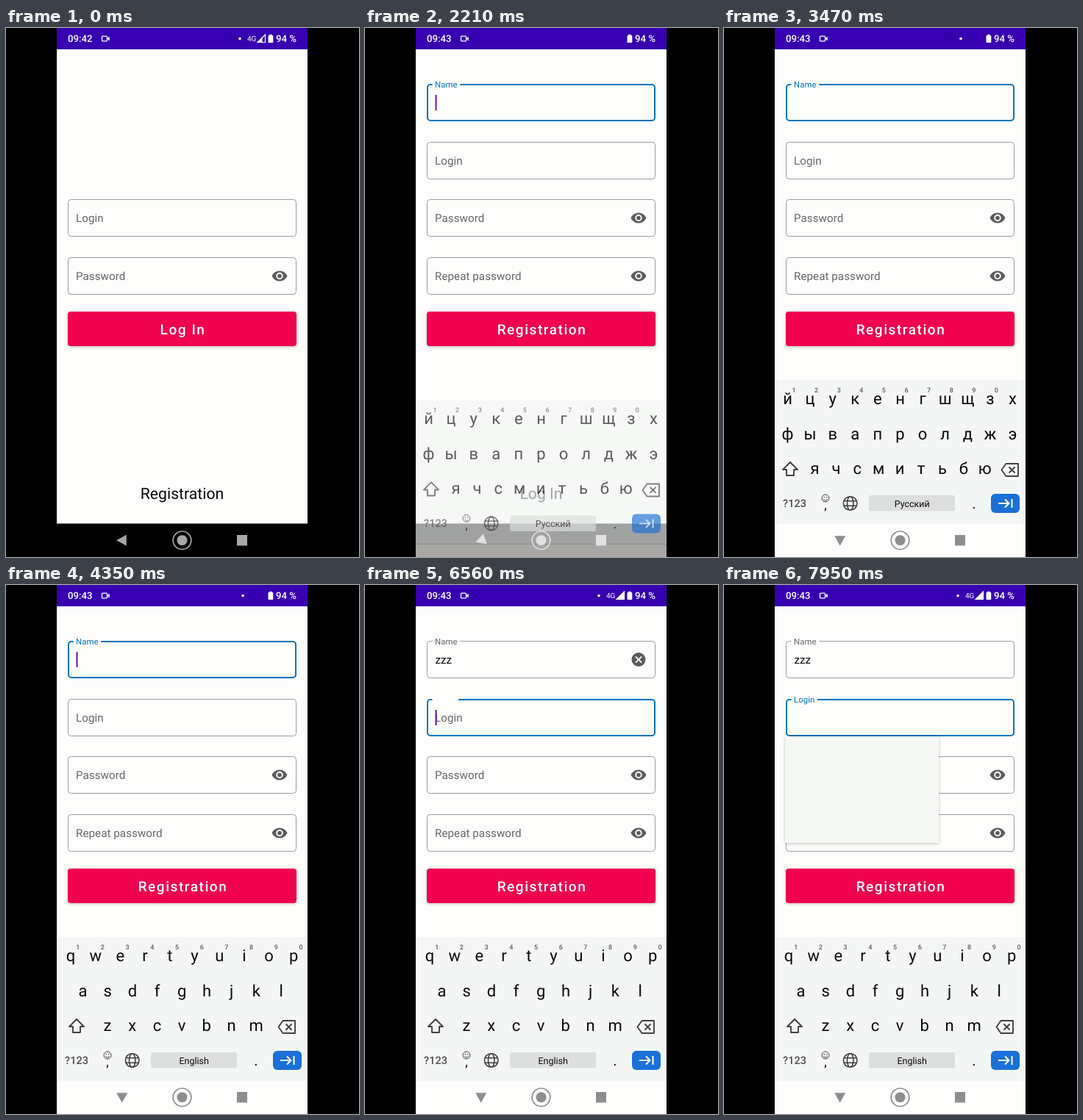
Write an HTML page with a canvas that moves like this. It is 480 px wide and 720 px high and loops after 8 s.

```html
<!DOCTYPE html>
<html lang="en">
<head>
<meta charset="utf-8">
<title>Registration form</title>
<style>
  html, body { margin: 0; height: 100%; overflow: hidden; background: #000; }
  canvas { display: block; }
</style>
</head>
<body>
<canvas id="stage" width="480" height="720"></canvas>
<script>
const ctx = document.getElementById('stage').getContext('2d');
const LOOP = 8000;
const PHONE = { x: 69, y: 0, w: 341, h: 720, cx: 239.5 };
const PAPER = '#fdfdfb', BOARD = '#f3f6f4', POPUP = '#f5f8f4', PURPLE = '#3700b0', RED = '#f00250';
const OUTLINE = '#9c9ca2', HINT = '#676767', INK = '#0a0a0a', ICON = '#424242', BLUE = '#0875bc';

const FOCUS_NAME = 1770, FOCUS_LOGIN = 6430, LOGIN_FLOAT = 6690;
const KEY_PRESSES = [5430, 5740, 6250], PRESS_TIME = 130;
const CURSOR_RESETS = [1640, 1900, ...KEY_PRESSES, FOCUS_LOGIN];

const LAYOUTS = {
  ru: { name: 'Русский', rows: ['йцукенгшщзх', 'фывапролджэ', 'ячсмитьбю'],
        starts: [86.5, 86.5, 123.5], steps: [30.6, 30.6, 28.9], digit: 8.5, shift: 90, erase: 389 },
  en: { name: 'English', rows: ['qwertyuiop', 'asdfghjkl', 'zxcvbnm'],
        starts: [88, 104.5, 138], steps: [33.7, 33.7, 33.7], digit: 9.7, shift: 96, erase: 382 }
};

const EYE = new Path2D('M12 4.5C7 4.5 2.73 7.61 1 12c1.73 4.39 6 7.5 11 7.5s9.27-3.11 11-7.5c-1.73-4.39-6-7.5-11-7.5z' +
  'M12 17a5 5 0 1 1 0-10a5 5 0 0 1 0 10zM12 9a3 3 0 1 0 0 6a3 3 0 0 0 0-6z');
const CLEAR = new Path2D('M12 2a10 10 0 1 0 0 20a10 10 0 0 0 0-20z' +
  'M17 15.6L15.6 17 12 13.4 8.4 17 7 15.6 10.6 12 7 8.4 8.4 7 12 10.6 15.6 7 17 8.4 13.4 12z');

const clamp = v => Math.max(0, Math.min(1, v));
const progress = (t, start, length) => clamp((t - start) / length);
const easeOut = (p, power = 3) => 1 - (1 - p) ** power;
const smooth = p => p * p * (3 - 2 * p);
const lerp = (a, b, p) => a + (b - a) * p;

function scoped(draw) {
  ctx.save();
  draw();
  ctx.restore();
}

function text(str, x, y, size, color, { weight = 400, align = 'left', spacing = 0 } = {}) {
  ctx.font = `${weight} ${size}px Roboto, sans-serif`;
  ctx.textRendering = 'geometricPrecision';
  ctx.letterSpacing = spacing + 'px';
  ctx.textAlign = align;
  ctx.fillStyle = color;
  ctx.fillText(str, x, y);
}

function rect(x, y, w, h, color, radius = 0) {
  ctx.fillStyle = color;
  ctx.beginPath();
  ctx.roundRect(x, y, w, h, radius);
  ctx.fill();
}

function raised(x, y, w, h, color, radius) {
  scoped(() => {
    ctx.shadowColor = 'rgba(0,0,0,.25)';
    ctx.shadowBlur = 4;
    ctx.shadowOffsetY = 1;
    rect(x, y, w, h, color, radius);
  });
}

function poly(points, close = true) {
  ctx.beginPath();
  points.forEach(([x, y]) => ctx.lineTo(x, y));
  if (close) ctx.closePath();
}

function line(color, width, ...points) {
  ctx.strokeStyle = color;
  ctx.lineWidth = width;
  poly(points, false);
  ctx.stroke();
}

function disc(x, y, r) {
  ctx.beginPath();
  ctx.arc(x, y, r, 0, 7);
}

function icon(path, cx, cy, alpha = 1) {
  scoped(() => {
    ctx.globalAlpha *= alpha;
    ctx.translate(cx, cy);
    ctx.scale(.948, .948);
    ctx.translate(-12, -12);
    ctx.fillStyle = '#5c5c5c';
    ctx.fill(path, 'evenodd');
  });
}

const fieldTop = row => Math.round(76 + 78.6 * row) + .5;

function field(row, label, { focused = false, gap = false, float = 0, eye = false, value = '', underline = false, clear = 0 } = {}) {
  const y = fieldTop(row), inset = focused ? .5 : 0;
  ctx.strokeStyle = focused ? BLUE : OUTLINE;
  ctx.lineWidth = focused ? 2 : 1;
  ctx.beginPath();
  ctx.roundRect(84.5 + inset, y + inset, 310 - 2 * inset, 50 - 2 * inset, 4);
  ctx.stroke();
  if (gap) {
    ctx.font = '11.4px Roboto, sans-serif';
    ctx.letterSpacing = '0px';
    rect(91.5, y - 1.5, ctx.measureText(label).width + 7.5, 4, PAPER);
  }
  const color = focused && float > 0 ? BLUE : HINT;
  text(label, 95, lerp(y + 30.5, y + 4.5, float), lerp(15.2, 11.4, float), color, { spacing: .04 });
  if (value) {
    text(value, 95.5, y + 30.5, 15.2, INK);
    if (underline) rect(96, y + 32, 7.5 * value.length, 1, INK);
  }
  if (eye) icon(EYE, 372, y + 25);
  if (clear) icon(CLEAR, 372, y + 25, clear);
}

function page(fields, button, link) {
  rect(PHONE.x, 0, PHONE.w, 720, '#000');
  rect(PHONE.x, 0, PHONE.w, 674.5, PAPER);
  rect(PHONE.x, 0, PHONE.w, 29, PURPLE);
  fields();
  raised(84, 386, 311, 47, RED, 4);
  text(button, 240.5, 417, 19, '#fff', { weight: 500, align: 'center', spacing: 1.55 });
  text(link, PHONE.cx, 640.5, 21.2, INK, { align: 'center' });
}

function loginPage() {
  page(() => {
    field(2, 'Login');
    field(3, 'Password', { eye: true });
  }, 'Log In', 'Registration');
}

function registrationPage(t) {
  const onLogin = t >= FOCUS_LOGIN;
  const onName = t >= FOCUS_NAME && !onLogin;
  const typed = KEY_PRESSES.filter(k => t >= k).length;
  const clear = progress(t, 5550, 120) * (1 - progress(t, LOGIN_FLOAT, 120));
  page(() => {
    field(0, 'Name', {
      focused: onName, gap: t >= FOCUS_NAME, float: smooth(progress(t, FOCUS_NAME, 167)),
      value: 'z'.repeat(typed), underline: !onLogin, clear
    });
    field(1, 'Login', { focused: onLogin, gap: onLogin, float: smooth(progress(t, LOGIN_FLOAT, 167)) });
    field(2, 'Password', { eye: true });
    field(3, 'Repeat password', { eye: true });
  }, 'Registration', 'Log In');

  const reset = CURSOR_RESETS.filter(r => t >= r).pop();
  if (reset !== undefined && (t - reset) % 1000 < 500) {
    const x = onLogin ? 95.5 : 95.5 + 7.6 * typed;
    rect(x, fieldTop(onLogin ? 1 : 0) + 14.5, 2, 21, '#6a0cc0');
  }
  if (t >= KEY_PRESSES[0] && !onLogin) raised(83, 127, 147.5, 48.5, POPUP, 1);
  if (t >= 7130) raised(83, 206, 209, 145, POPUP, 1);
}

function globe(x, y) {
  ctx.lineWidth = 1.6;
  ctx.strokeStyle = ICON;
  disc(x, y, 9.3);
  ctx.stroke();
  ctx.beginPath();
  ctx.ellipse(x, y, 4.2, 9.3, 0, 0, 7);
  ctx.stroke();
  for (const dy of [-3.3, 3.3]) line(ICON, 1.6, [x - 8.6, y + dy], [x + 8.6, y + dy]);
}

function smiley(x, y) {
  ctx.strokeStyle = ctx.fillStyle = ICON;
  ctx.lineWidth = 1;
  disc(x, y, 5);
  ctx.stroke();
  ctx.beginPath();
  ctx.arc(x, y + .5, 2.6, .3, 2.85);
  ctx.stroke();
  for (const dx of [-1.8, 1.8]) { disc(x + dx, y - 1.3, .8); ctx.fill(); }
}

function keyboard(layout, pressed) {
  const { name, rows, starts, steps, digit, shift, erase } = layout;
  const centered = { align: 'center' };
  rect(PHONE.x, 479, PHONE.w, 196, BOARD);
  rect(PHONE.x, 675, PHONE.w, 45, PAPER);
  rows.forEach((row, r) => [...row].forEach((letter, i) =>
    text(letter, starts[r] + steps[r] * i, 512 + 47.5 * r, 22, INK, centered)));
  [...'1234567890'].forEach((d, i) =>
    text(d, starts[0] + digit + steps[0] * i, 496, 9, '#5c5c5c', { align: 'center', weight: 500 }));

  ctx.strokeStyle = ICON;
  ctx.lineWidth = 1.9;
  ctx.lineJoin = 'round';
  poly([[0, -10], [10, 0], [5, 0], [5, 8], [-5, 8], [-5, 0], [-10, 0]].map(([x, y]) => [shift + x, 601 + y]));
  ctx.stroke();
  poly([[-11.5, 0], [-5.5, -8.5], [11, -8.5], [11, 8.5], [-5.5, 8.5]].map(([x, y]) => [erase + x, 601.5 + y]));
  ctx.stroke();
  for (const s of [-1, 1]) line(ICON, 1.9, [erase - 1.5, 601.5 - 4 * s], [erase + 6.5, 601.5 + 4 * s]);

  text('?123', 96, 652, 14.5, '#4c4c4c', { align: 'center', weight: 500 });
  smiley(138, 640);
  text(',', 138, 655, 18, INK, centered);
  globe(171.7, 647);
  rect(197, 636, 117, 21.5, '#dcdfdd', 3);
  text(name, 255.7, 652, 12.5, INK, centered);
  text('.', 340, 654, 20, INK, centered);
  rect(363, 634, 39, 26, '#1a70d6', 6);
  line('#fff', 2, [373, 647], [387, 647]);
  line('#fff', 2, [382, 641.5], [387.5, 647], [382, 652.5]);
  line('#fff', 2, [391.5, 641], [391.5, 653]);

  if (pressed) {
    raised(119.5, 515, 37, 106, '#eef1f0', 4);
    text('z', 138, 550, 25, INK, centered);
  }
}

function navIcons(shown) {
  const color = shown === 0 ? '#a8a8a8' : shown === 1 ? '#8e8e8e' : '#e0e0e0';
  ctx.fillStyle = ctx.strokeStyle = color;
  scoped(() => {
    ctx.translate(157.7, 697.3);
    ctx.rotate(-Math.PI / 2 * smooth(shown && 1 - (1 - shown) ** (1 / 3)));
    poly([[-7.5, 0], [6, -7.5], [6, 7.5]]);
    ctx.fill();
  });
  ctx.lineWidth = 1.7;
  disc(239.5, 697.3, 12.3);
  ctx.stroke();
  disc(239.5, 697.3, 7);
  ctx.fill();
  rect(314, 690, 14, 14.5, color);
}

function statusIcons(t) {
  const white = '#fff';
  text(t < 1900 ? '09:42' : '09:43', 84, 19, 13.2, white, { weight: 500 });
  ctx.strokeStyle = white;
  ctx.lineWidth = 1.3;
  ctx.beginPath();
  ctx.roundRect(130.5, 11.2, 7, 6.6, 1);
  ctx.stroke();
  ctx.fillStyle = white;
  poly([[137.5, 14.5], [140.7, 11.5], [140.7, 17.5]]);
  ctx.fill();

  const early = t < 1900, signal = early || t >= 4950;
  if (signal || t >= 2700) {
    ctx.fillStyle = white;
    disc(signal ? 318 : 322, 14.5, 1.8);
    ctx.fill();
  }
  if (signal) {
    text('4G', 328, 18, 10, white);
    ctx.lineWidth = 1.2;
    poly([[342, 19.5], [352.5, 19.5], [352.5, 9]]);
    ctx.stroke();
    const x = early ? 348.5 : 352.5;
    poly([[342, 19.5], [x, 19.5], [x, 361.5 - x]]);
    ctx.fill();
  }
  rect(356.5, 10, 6.8, 10, white, 1);
  rect(358.3, 8.7, 3.2, 2, white);
  text('94 %', 367, 19, 13.2, white, { weight: 500 });
}

function zoomed(scale, alpha, draw) {
  scoped(() => {
    ctx.globalAlpha = alpha;
    ctx.translate(PHONE.cx, 360);
    ctx.scale(scale, scale);
    ctx.translate(-PHONE.cx, -360);
    draw();
  });
}

function draw(t) {
  ctx.fillStyle = '#000';
  ctx.fillRect(0, 0, 480, 720);
  scoped(() => {
    ctx.beginPath();
    ctx.rect(PHONE.x, PHONE.y, PHONE.w, PHONE.h);
    ctx.clip();

    const opened = easeOut(progress(t, 50, 340), 4);
    if (opened < 1) zoomed(lerp(1, 1.15, opened), 1, loginPage);
    if (opened > 0) zoomed(lerp(.85, 1, opened), progress(t, 70, 70), () => registrationPage(t));

    const shown = easeOut(progress(t, 2130, 270));
    if (shown > 0) scoped(() => {
      ctx.globalAlpha = shown;
      ctx.translate(0, 80 * (1 - shown));
      const pressed = KEY_PRESSES.some(k => t >= k && t < k + PRESS_TIME);
      keyboard(t < 3650 ? LAYOUTS.ru : LAYOUTS.en, pressed);
    });
    navIcons(shown);
    statusIcons(t);
  });
}

function tick() {
  draw(performance.now() % LOOP);
  requestAnimationFrame(tick);
}
tick();
</script>
</body>
</html>
```
